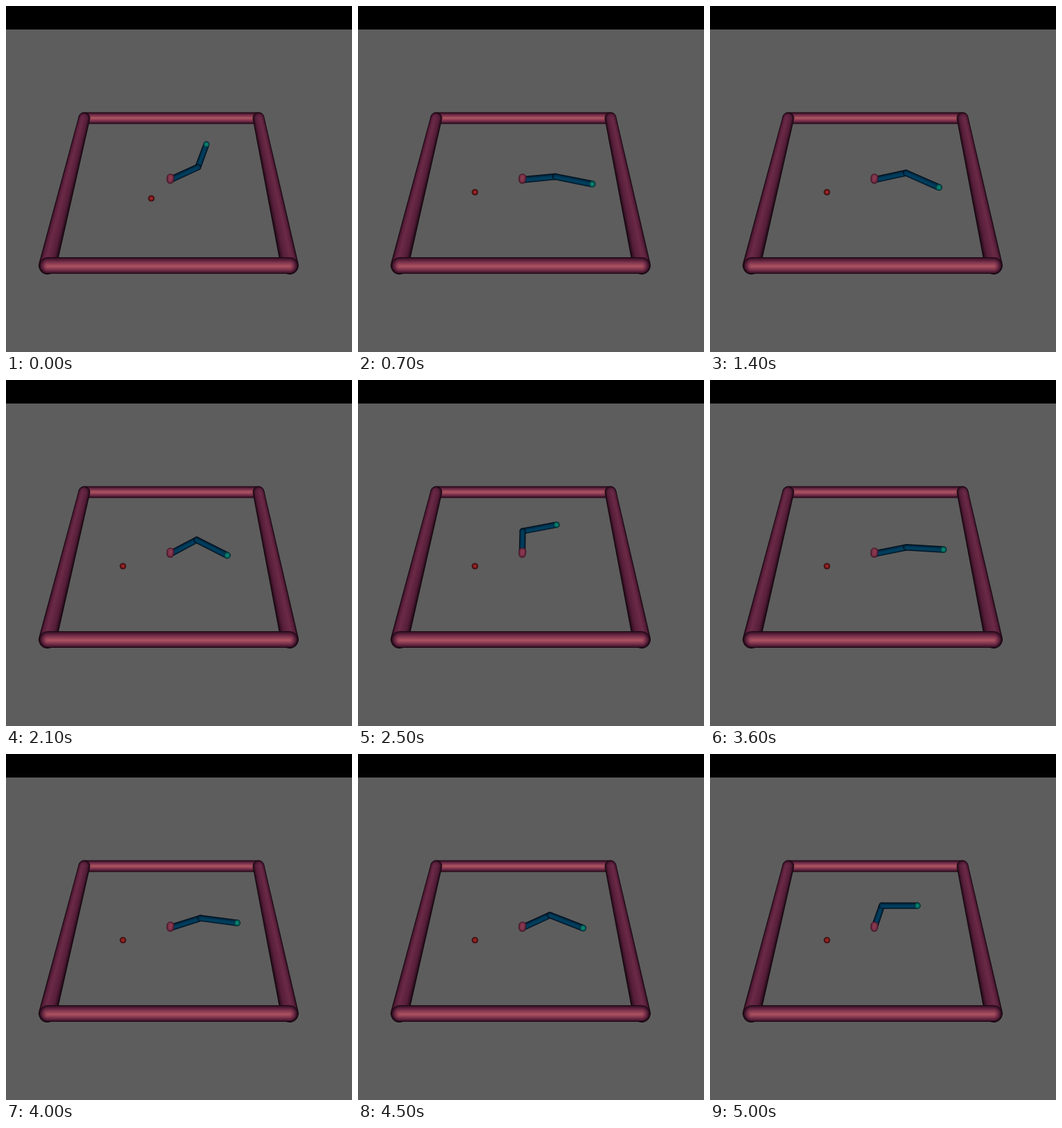
An HTML page with a canvas that plays this animation: 500x500 px, repeating every 5100 ms.

```html
<!DOCTYPE html>
<html>
<head>
<meta charset="utf-8">
<style>
  html, body { margin: 0; width: 100%; height: 100%; overflow: hidden; background: #000; }
  canvas { display: block; width: 500px; height: 500px; }
</style>
</head>
<body>
<canvas id="stage" width="500" height="500"></canvas>
<script>
const ctx = document.getElementById('stage').getContext('2d');
const STEP = 100, STEPS = 51;
const UPPER = 0.1, FORE = 0.111, WALL = 0.3;
const RAD = Math.PI / 180;

// Edge, body and highlight of each material
const PINK = ['#1c0814', '#642442', '#a8505f'];
const PLUM = ['#14060e', '#561e3a', '#6a2a46'];
const BLUE = ['#000e1a', '#002e4a', '#00405f'];
const TEAL = ['#00303a', '#006a60', '#148a6e'];
const RED = ['#2a0406', '#761618', '#a03030'];

const REST = { shoulder: 33, bend: 41 };
const POSES = [
  { step: 1, shoulder: 1, bend: -1 },
  { step: 14, shoulder: 17, bend: -50 },
  { step: 21, shoulder: 37, bend: -74 },
  { step: 24, shoulder: 70, bend: -78 },
  { step: 29, shoulder: 205, bend: -37 },
  { step: 36, shoulder: 376, bend: -21 },
  { step: 45, shoulder: 393, bend: -63 },
  { step: 50, shoulder: 437, bend: -77 }
];

// Perspective of the table plane, in table units
function project(x, y) {
  const w = 1 + 0.543 * y;
  return { x: (237.3 + 488 * x + 135.3 * y) / w, y: (251.15 - 209.2 * y) / w, scale: 1 / w };
}

function rate(i, joint) {
  const a = POSES[i], b = POSES[i + 1];
  return (b[joint] - a[joint]) / (b.step - a.step);
}

// Harmonic mean of neighbouring rates: smooth, without overshoot
function slope(i, joint) {
  const last = POSES.length - 1;
  if (i === 0 || i === last) return rate(Math.min(i, last - 1), joint);
  const p = rate(i - 1, joint), q = rate(i, joint);
  return p * q > 0 ? 2 * p * q / (p + q) : 0;
}

function angleAt(step, joint) {
  if (step < 1) return REST[joint] * RAD;
  let i = 0;
  while (i < POSES.length - 2 && POSES[i + 1].step <= step) i++;
  const a = POSES[i], b = POSES[i + 1], span = b.step - a.step;
  const u = (step - a.step) / span, v = 1 - u;
  return RAD * (a[joint] + (b[joint] - a[joint]) * u * u * (3 - 2 * u) +
    span * u * v * (slope(i, joint) * v - slope(i + 1, joint) * u));
}

function shade(colors, u) {
  const i = u < 0.5 ? 0 : 1, k = u * 2 - i;
  const part = (color, n) => parseInt(color.substr(1 + 2 * n, 2), 16);
  const mix = n => Math.round(part(colors[i], n) * (1 - k) + part(colors[i + 1], n) * k);
  return `rgb(${[0, 1, 2].map(mix)})`;
}

function capsulePath(a, b, ra, rb) {
  const angle = Math.atan2(b.y - a.y, b.x - a.x);
  const spread = Math.acos((ra - rb) / Math.max(Math.hypot(b.x - a.x, b.y - a.y), 1));
  ctx.beginPath();
  ctx.arc(a.x, a.y, ra, angle + spread, angle - spread + 2 * Math.PI);
  ctx.arc(b.x, b.y, rb, angle - spread, angle + spread);
  ctx.closePath();
}

// Nested shells give a rounded tube; dx, dy push the lit side off centre
function tube(a, b, ra, rb, colors, dx = 0, dy = 0) {
  const layers = Math.ceil(Math.max(ra, rb));
  for (let i = 0; i < layers; i++) {
    const t = i / layers, k = 1 - t;
    const move = (p, r) => ({ x: p.x + dx * r * t, y: p.y + dy * r * t });
    capsulePath(move(a, ra), move(b, rb), ra * k, rb * k);
    ctx.fillStyle = shade(colors, Math.pow(i / (layers - 1), 0.7));
    ctx.fill();
  }
}

const ball = (p, r, colors) => tube(p, p, r, r, colors);

function drawWalls() {
  const [backL, backR, frontL, frontR] =
    [[-1, 1], [1, 1], [-1, -1], [1, -1]].map(([x, y]) => project(x * WALL, y * WALL));
  const back = 8.5, front = 12;
  tube(backL, backR, back, back, PINK);
  tube(backL, frontL, back, front + 1, PLUM, -0.35);
  tube(backR, frontR, back, front + 1, PLUM, 0.35);
  tube(frontL, frontR, front, front, PINK, 0, 0.1);
}

function drawBase() {
  tube({ x: 237.7, y: 247.8 }, { x: 237.4, y: 251.6 }, 5.6, 5.2, ['#401426', '#742e46', '#8a3c50'], 0, -0.2);
}

function drawArm(step) {
  const a = angleAt(step, 'shoulder'), b = a + angleAt(step, 'bend');
  const ex = UPPER * Math.cos(a), ey = UPPER * Math.sin(a);
  const tx = ex + FORE * Math.cos(b), ty = ey + FORE * Math.sin(b);
  const root = project(0, 0), elbow = project(ex, ey), tip = project(tx, ty);
  const r = 4.8;
  const parts = [
    { depth: 0, paint: drawBase },
    { depth: ey, paint: () => tube(root, elbow, r, r * elbow.scale, BLUE, 0, 0.25) },
    { depth: ty, paint() {
      tube(elbow, tip, r * elbow.scale, r * tip.scale, BLUE, 0, 0.25);
      ball(tip, r * tip.scale, TEAL);
    } }
  ];
  parts.sort((p, q) => q.depth - p.depth).forEach(part => part.paint());
}

function draw(now) {
  const step = Math.floor(now / STEP) % STEPS;
  ctx.fillStyle = '#000';
  ctx.fillRect(0, 0, 500, 34);
  ctx.fillStyle = '#5d5d5d';
  ctx.fillRect(0, 34, 500, 466);
  drawWalls();
  ball(step < 1 ? { x: 210, y: 278 } : { x: 169, y: 269 }, 4.6, RED);
  drawArm(step);
}

const start = performance.now();
function tick() {
  draw(performance.now() - start);
  requestAnimationFrame(tick);
}
tick();
</script>
</body>
</html>
```
